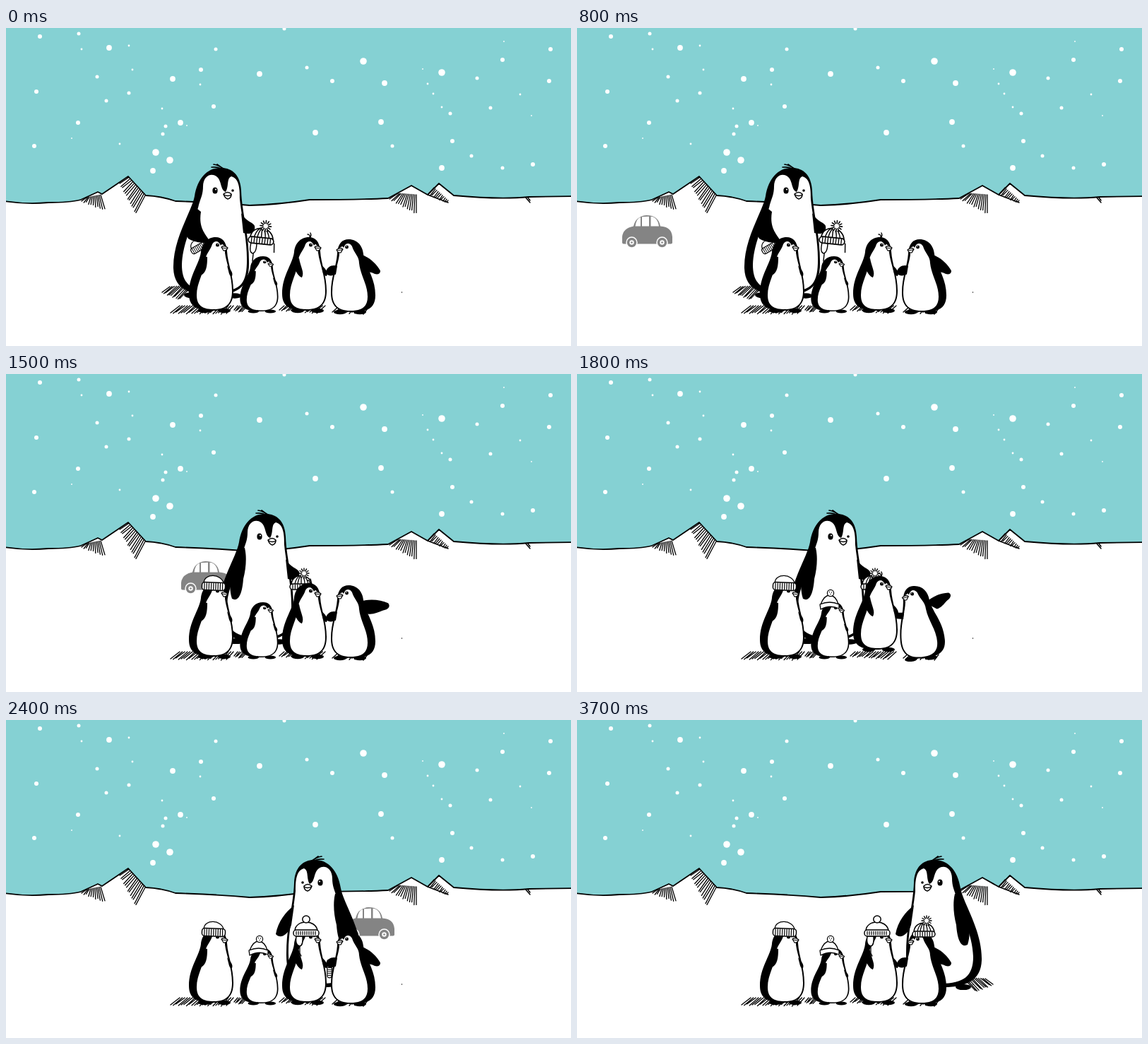
An HTML page that plays this animation: 800 px wide and 450 px high, repeating every 4.2 s.

```html
<!DOCTYPE html>
<html lang="en">
<head>
<meta charset="utf-8">
<title>Penguins and hats</title>
<style>
html, body { margin: 0; width: 100%; height: 100%; overflow: hidden; background: #fff }
svg { display: block; width: 100%; height: 100% }
</style>
</head>
<body>
<svg viewBox="0 0 800 450" stroke-linecap="round" stroke-linejoin="round">
  <g id="land"></g>
  <g id="cast"></g>
</svg>
<script>
const FRAME = 100, LOOP = 4200, LAST = 37;
const $ = id => document.getElementById(id);
const black = d => `<path d="${d}"/>`;
const white = d => `<path d="${d}" fill="#fff"/>`;
const line = (d, w = 1.3) => `<path d="${d}" fill="none" stroke="#000" stroke-width="${w}"/>`;
const shape = (d, w = 1.5) => `<path d="${d}" fill="#fff" stroke="#000" stroke-width="${w}"/>`;
const dot = (x, y, r, c = '#000') => `<circle cx="${x}" cy="${y}" r="${r}" fill="${c}"/>`;
const foot = (x, y, r) => `<ellipse cx="${x}" cy="${y}" rx="${r}" ry="${r / 2.7}"/>`;
const group = (t, s) => `<g transform="${t}">${s}</g>`;
const at = (x, y, s, more = '') => group(`translate(${x} ${y}) ${more}`, s);

// n strokes from the edge a-b to the edge c-d
function hatch(ax, ay, bx, by, cx, cy, dx, dy, n, w = 1.3) {
  let d = '';
  for (let i = 0; i < n; i++) {
    const k = i / (n - 1), wob = Math.sin(i * 2.4) * 1.2;
    d += `M${ax + (bx - ax) * k},${ay + (by - ay) * k}L${cx + (dx - cx) * k},${cy + (dy - cy) * k + wob}`;
  }
  return line(d, w);
}

function landscape() {
  const flakes = {
    4.8: [506,47, 617,63, 212,176, 232,187],
    3.9: [236,72, 359,65, 536,78, 438,148, 531,133, 208,202, 247,134, 617,198, 146,28],
    3: [48,12, 102,134, 43,90, 40,167, 276,59, 462,75, 703,45, 769,75, 632,160, 746,193, 771,30, 294,111],
    2.5: [129,69, 297,30, 426,56, 174,92, 142,103, 226,139, 222,150, 547,167, 703,198, 686,113, 629,121, 667,71, 659,181, 103,8, 394,1],
    1.4: [107,30, 179,59, 275,80, 597,79, 605,93, 617,112, 728,94, 221,114, 161,164, 174,25],
    0.9: [93,156, 256,138, 590,58, 744,124, 705,19]
  };
  let s = '<rect width="800" height="450" fill="#85d1d3"/>';
  for (const r in flakes)
    for (let i = 0; i < flakes[r].length; i += 2) s += dot(flakes[r][i], flakes[r][i + 1], r, '#fff');
  const ridge = 'M-3,245 Q30,250 60,247 Q90,247 106,243 L130,232 L136,235 L173,210 L198,237' +
    ' Q220,238 240,245 Q300,247 345,251 Q385,250 430,243 Q500,243 541,241 L574,223 L597,236' +
    ' L613,220 L634,237 Q700,243 740,239 L803,238';
  return s + white(ridge + 'V453H-3Z') + line(ridge, 1.8) +
    hatch(114,240, 134,236, 107,245, 140,257, 11) +
    hatch(173,212, 197,237, 161,220, 184,262, 13) +
    hatch(555,234, 581,236, 543,242, 581,262, 13) +
    hatch(606,226, 626,244, 598,235, 624,247, 11) +
    line('M597,236 L626,247 M736,240 L742,247 M739,240 L742,244', 1.5) +
    dot(560.5, 374, 0.7);
}

function car(x) {
  const grey = '#848484';
  const wheel = cx => dot(cx, 39, 8.2, '#fff') + dot(cx, 39, 6.7, grey) + dot(cx, 39, 3.2, '#fff') + dot(cx, 39, 1.3, grey);
  return at(x, 264.5, `<path fill="${grey}" d="M0,39 V31 Q1,19 16,16 Q19,2 34,.5 Q51,0 54,16 Q70,17 71,31 V39 Q71,41 68,41 H2 Q0,41 0,39Z"/>` +
    white('M18.5,16 Q20,5 26,3.2 V16Z M28,16 V2.8 Q33,2 38,2.2 V16Z M40.5,16 V2.3 Q50,3 52,16Z') +
    wheel(13.5) + wheel(56.5));
}

// Hats are centred on the band
function ribs(from, to, step, y, h) {
  let d = '';
  for (let x = from; x <= to; x += step) d += `M${x},${y}v${h}`;
  return line(d, 1.2);
}
const band = (w, y, h) => `<rect x="${-w / 2}" y="${y}" width="${w}" height="${h}" rx="4" fill="#fff" stroke="#000" stroke-width="1.5"/>`;
const beanie = shape('M-14,-4 C-14,-18 11,-18 14,-4Z', 1.3) + band(33, -5, 11) + ribs(-13, 13, 3.2, -4, 9);
const bobble = shape('M-13,-1 Q-8,-14 0,-14 Q9,-13 12,-1Z', 1.3) +
  shape('M-14,-1 Q0,-7 13,-1 L13,5 Q0,-1 -13,6Z', 1.3) + dot(1, -17, 5.2) + dot(1, -17, 4, '#fff') +
  dot(-.5, -18.5, .7) + dot(2.5, -18, .7) + dot(1, -15.5, .7);
const flaps = shape('M-14,4 Q-16,17 -9,18 Q-4,17 -5,4Z') + line('M-9,18 L-9,29 M-11,31 L-9,28 L-7,32') +
  shape('M-16,-4 C-15,-20 14,-20 16,-4Z') + band(36, -5, 9) + ribs(-14, 15, 3, -3, 5) + shape('M5.2,-20 a5.2,5 0 1 1 -10.4,0 a5.2,5 0 1 1 10.4,0');
function rays() {
  let d = '';
  for (let i = 0; i < 12; i++) {
    const a = i * Math.PI / 6, c = Math.cos(a), s = Math.sin(a);
    d += `M${4 + c * 3.5},${-19 + s * 3.5}L${4 + c * 7},${-19 + s * 7}`;
  }
  return dot(4, -19, 6, '#fff') + line(d, 1.4);
}
const ribbed = shape('M-14,-3 C-13,-20 12,-20 15,-3Z') +
  line('M-9,-4 Q-7,-12 -3,-15 M-5,-4 Q-4,-11 -1,-15 M0,-4 V-15 M5,-4 Q5,-11 2,-15 M10,-4 Q8,-12 4,-15') +
  band(32, -4, 8) + ribs(-12, 13, 3.4, -3, 6);
const starHat = ribbed + rays();

function parent(step) {
  const pose = step < 13 ? 0 : step < 19 ? 1 : step < 25 ? 2 : 3;
  const place = ['', 'translate(63 0)', 'translate(741 0) scale(-1 1)', 'translate(810 0) scale(-1 1)'][pose];
  const body =
    (pose % 3 ? '' : hatch(232,366, 264,364, 221,374, 246,384, 11)) +
    foot(263, 378, 11) + foot(324, 379, 10) +
    line('M306,200 Q300,196 291,197 M308,200 Q302,194 294,193 M311,201 Q304,197 299,193', 1.7) +
    black('M305,198 C285,197 271,213 267,238 C263,260 236,298 237,340 C238,368 258,378 290,378 C328,378 345,368 344,330 C344,290 334,262 333,230 C332,208 320,198 305,198Z') +
    white('M279,224 C279,210 290,204 298,210 C306,216 303,229 311,232 C316,224 312,213 319,210 C331,213 331,230 331,242 C334,272 342,300 341,333 C340,364 330,373 295,373 C262,373 249,362 249,335 C250,300 269,270 273,250 C276,240 279,235 279,224Z') +
    `<ellipse cx="296" cy="230" rx="3.6" ry="4.5"/>` + dot(297, 228.5, 1.1, '#fff') + dot(321, 230, 1.8) +
    shape('M308,235 Q314,230 319,235 Q319,241 314,242 Q310,241 308,235Z') + line('M309,236 Q314,239 319,236') +
    black(pose < 2 ? 'M333,262 C340,274 350,275 352,280 C354,290 345,293 336,290Z'
                   : 'M333,262 C345,272 356,285 359,303 C352,311 341,303 337,290Z');
  const wing = black(pose ? 'M268,246 C255,275 251,300 257,318 C268,324 272,305 273,290 C277,275 278,258 275,246Z'
                          : 'M266,252 C258,272 253,290 258,298 C268,304 282,305 289,303 C284,292 272,285 276,260Z');
  let held = '';
  if (pose == 0) held = (step < 10 ? at(274, 310, beanie, 'rotate(-30) scale(.8)') : at(261, 324, beanie, 'rotate(-5) scale(.85)'));
  if (pose == 2) held = at(458, 352, ribbed, 'rotate(90) scale(.8)');
  if (pose == 3 && step < 33) held = at(544, 330, ribbed, 'rotate(8)');
  let front = '';
  if (pose == 0) front = at(361, 301, shape('M-12,3 Q-14,16 -9,17 Q-4,16 -5,3Z', 1.3) + line('M-8,17 V27 M17,2 L18,13') + starHat, 'rotate(6) scale(1.12)');
  if (pose == 1) front = at(418, 301, starHat);
  return group(place, body) + held + group(place, wing) + front;
}

// One young penguin, feet at the origin, looking right
function chick(wings) {
  return foot(-9, 0, 9) + foot(19, 0, 9) +
    black('M7,-104 C-6,-104 -13,-94 -14,-83 C-16,-66 -31,-50 -31,-24 C-31,-6 -20,0 2,0 C24,0 32,-10 32,-28 C32,-50 24,-66 23,-84 C22,-98 16,-104 7,-104Z') +
    white('M2,-94 C-1,-84 -8,-80 -8,-70 C-10,-52 -20,-40 -20,-22 C-20,-6 -10,-2 4,-2 C24,-2 30,-12 30,-28 C30,-50 22,-66 20,-82 C21,-92 17,-97 14,-92 C11,-100 5,-99 2,-94Z') +
    dot(9.5, -93, 2.5) + dot(10, -94, .7, '#fff') + dot(18, -94, 1.3) +
    shape('M15,-90 Q19,-93 24,-89 Q22,-84 18,-85Z', 1.2) + line('M16,-89 L23,-88', 1) + wings;
}
const sideWings = black('M-14,-78 C-21,-62 -19,-52 -14,-50 C-6,-54 -5,-64 -5,-76Z M23,-64 C28,-58 32,-54 30,-49 C27,-48 26,-52 25,-56Z');
const openWings = black('M-15,-76 C-18,-62 -8,-48 -3,-47 C1,-54 -5,-62 -7,-74Z M25,-64 C30,-60 35,-54 32,-49 C28,-49 27,-53 26,-57Z');

function waver(step, hatted) {
  const phase = hatted ? 0 : step % 4;
  const lift = [0, 38, 60, 38][phase], lean = [0, 0, -5, 0][phase];
  const back = at(-13, -78, black('M2,-4 C-9,-1 -20,9 -25,19 C-25,25 -19,25 -14,22 C-8,20 -1,19 3,14Z'),
    `rotate(${lift}) scale(${phase % 2 ? 1.15 : 1})`);
  const fore = black(phase == 2 ? 'M23,-68 C31,-66 40,-71 49,-72 C51,-66 44,-60 25,-58Z'
                                : 'M23,-66 C30,-68 37,-66 40,-56 C35,-50 29,-52 25,-54Z');
  return at(492, 402, chick(back + fore), `rotate(${lean}) scale(-1 .99)`);
}

const shadows = hatch(246,393, 322,393, 233,403, 312,404, 22) + hatch(328,393, 341,394, 323,399, 334,402, 6) +
  hatch(394,393, 452,393, 387,399, 440,403, 17) + hatch(470,395, 512,397, 462,402, 506,404, 12);

function carX(step) {
  const keys = [[0, -149], [6, 11], [8, 64], [12, 171], [24, 479], [30, 629], [36, 788], [37, 815]];
  const i = Math.max(1, keys.findIndex(k => step <= k[0]));
  const [a, x] = keys[i - 1], [b, y] = keys[i];
  return x + (y - x) * (step - a) / (b - a);
}

function scene(step) {
  const hat = [step >= 10, step >= 16, step >= 22, step >= 34];
  const hop = !hat[2] && step % 4 == 2 ? -10 : 0;
  const tuft = line('M8,-103 Q9,-108 5,-108 M8,-103 Q11,-106 9,-110', 1.4);
  return car(carX(step)) + shadows + parent(step) +
    at(290, 400, chick(sideWings)) + (hat[0] ? at(294, 300, beanie, 'rotate(2)') : '') +
    at(358, 401, chick(sideWings), 'scale(.86 .75)') + (hat[1] ? at(358, 327, bobble) : '') +
    waver(step, hat[3]) + (step >= 33 ? at(491, hat[3] ? 303 : 282, starHat) : '') +
    at(422, 400 + hop, (hat[2] ? '' : tuft) + chick(openWings)) + (hat[2] ? at(425, 302, flaps) : '');
}

$('land').innerHTML = landscape();
let shown = -1;
const start = performance.now();
function tick() {
  const t = (performance.now() - start) % LOOP;
  const step = Math.min(LAST, Math.floor(t / FRAME));
  if (step != shown) $('cast').innerHTML = scene(shown = step);
  requestAnimationFrame(tick);
}
tick();
</script>
</body>
</html>
```
